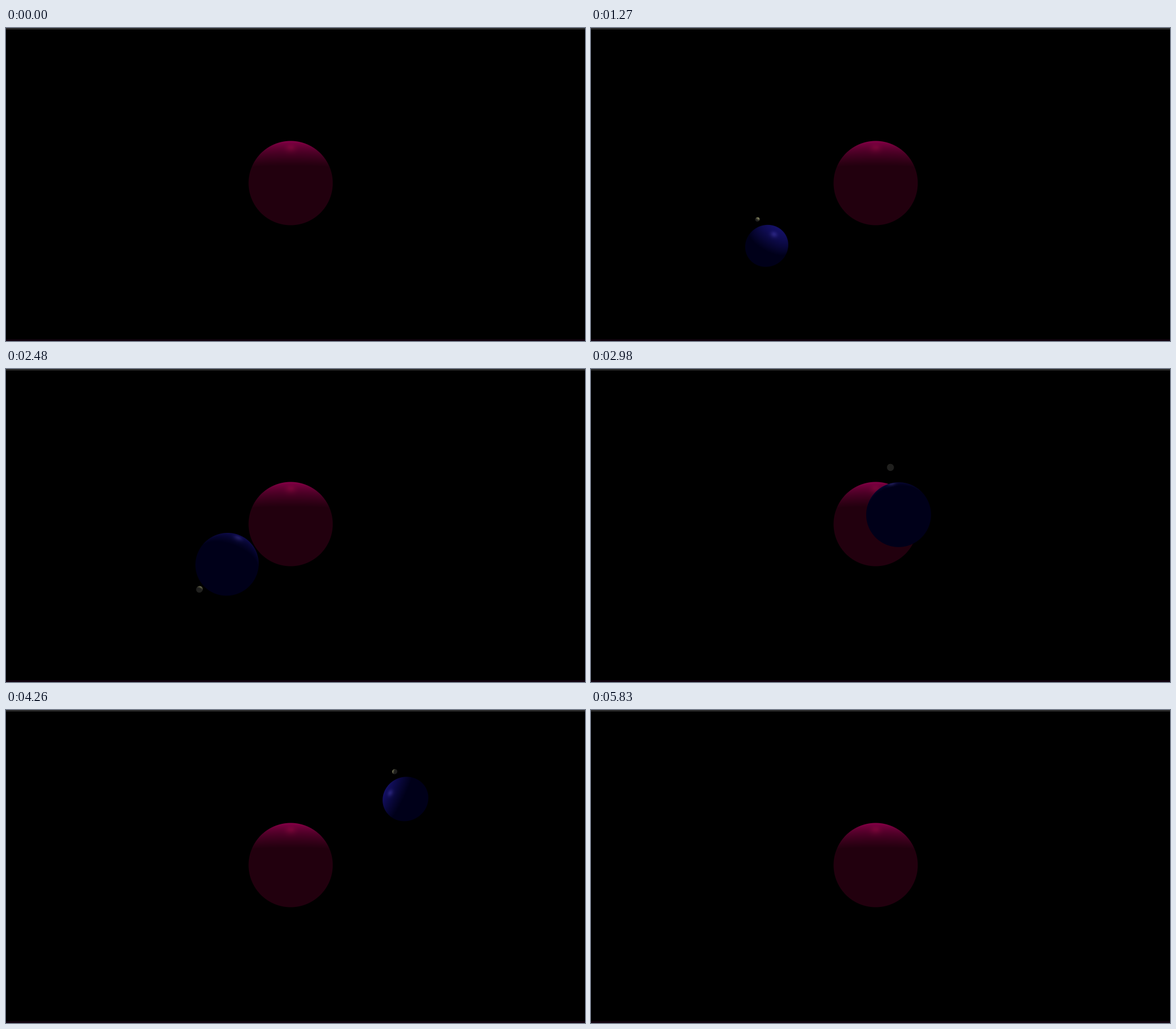
These frames come from a looping animation (1018x550 px, 5.86 s). An HTML page with a canvas:

```html
<!DOCTYPE html>
<html lang="en">
<head>
<meta charset="utf-8">
<title>Orbit</title>
<style>
  html, body { margin: 0; width: 100%; height: 100%; overflow: hidden; background: #000; }
  canvas { display: block; width: 1018px; height: 550px; }
</style>
</head>
<body>
<canvas id="stage" width="1018" height="550"></canvas>
<script>
const LOOP = 5860, STEP = LOOP / 174;
const FOCAL = 650, CENTER = { x: 500.5, y: 272.5 };
const SUN_DEPTH = 17.5, ORBIT = 6.08, MOON_ORBIT = 1.5;
const LIGHT = [0, -5.4, SUN_DEPTH];
const TILT = Math.PI / 6, COS = Math.cos(TILT), SIN = Math.sin(TILT);

const sun = { radius: 1.98, ambient: [34, 0, 14], diffuse: [106, 0, 60], specular: [24, 4, 8] };
const planet = { radius: 1, ambient: [0, 0, 25], diffuse: [20, 16, 76], specular: [24, 22, 40] };
const moon = { radius: 0.108, ambient: [32, 32, 30], diffuse: [96, 96, 62], specular: [20, 20, 16] };

const ctx = document.getElementById('stage').getContext('2d');

const rad = deg => deg * Math.PI / 180;
const dot = (a, b) => a[0] * b[0] + a[1] * b[1] + a[2] * b[2];
const sub = (a, b) => a.map((v, i) => v - b[i]);
const unit = a => { const n = Math.hypot(...a); return a.map(v => v / n); };
const clamp01 = v => Math.max(0, Math.min(1, v));

// Coordinates along the tilted orbit line, its upward normal and depth
const tilted = (along, up, depth) => [-COS * along - SIN * up, SIN * along - COS * up, depth];

function shade(body, point, ray) {
  const normal = unit(sub(point, body.pos));
  const toLight = unit(sub(LIGHT, point));
  const half = unit(sub(toLight, ray));
  const diffuse = Math.max(0, dot(normal, toLight));
  const specular = diffuse > 0 ? Math.max(0, dot(normal, half)) ** 64 : 0;
  return body.ambient.map((a, i) => a + body.diffuse[i] * diffuse + body.specular[i] * specular);
}

function renderSphere(body) {
  const [x, y, z] = body.pos, R = body.radius, scale = FOCAL / z;
  const reach = Math.ceil(R * scale * 1.12) + 4, size = reach * 2;
  const left = Math.round(CENTER.x + x * scale) - reach;
  const top = Math.round(CENTER.y + y * scale) - reach;
  const layer = body.layer || (body.layer = document.createElement('canvas'));
  layer.width = layer.height = size;
  const layerCtx = layer.getContext('2d');
  const image = layerCtx.createImageData(size, size);
  const distSq = dot(body.pos, body.pos);

  for (let row = 0; row < size; row++) {
    for (let col = 0; col < size; col++) {
      const ray = unit([left + col + 0.5 - CENTER.x, top + row + 0.5 - CENTER.y, FOCAL]);
      const nearest = dot(ray, body.pos);
      const missSq = Math.max(0, distSq - nearest * nearest);
      const coverage = clamp01((R - Math.sqrt(missSq)) * scale + 0.5);
      if (!coverage) continue;
      const hit = nearest - Math.sqrt(Math.max(0, R * R - missSq));
      const color = shade(body, ray.map(v => v * hit), ray);
      image.data.set([...color, coverage * 255], (row * size + col) * 4);
    }
  }
  layerCtx.putImageData(image, 0, 0);
  body.left = left;
  body.top = top;
}

function place(seconds) {
  const turn = rad(9.3 + 60.2 * seconds);
  const moonTurn = rad(29.5 + 240 * seconds);
  const c = Math.cos(turn), s = Math.sin(turn);
  planet.pos = tilted(ORBIT * s, 0, SUN_DEPTH + ORBIT * c);
  planet.pos[1] -= 0.12 * c;
  // The moon's orbital plane turns along with the planet
  const side = MOON_ORBIT * Math.sin(moonTurn);
  const offset = tilted(side * c, MOON_ORBIT * Math.cos(moonTurn), -side * s);
  moon.pos = planet.pos.map((v, i) => v + offset[i]);
}

function draw(ms) {
  place(Math.floor(ms / STEP + 0.3) * STEP / 1000);
  renderSphere(planet);
  renderSphere(moon);
  ctx.fillStyle = '#000';
  ctx.fillRect(0, 0, 1018, 550);
  ctx.fillStyle = '#2b2b2b';
  ctx.fillRect(0, 0, 1018, 2);
  ctx.fillStyle = '#1c1c1c';
  ctx.fillRect(0, 2, 1018, 1);
  ctx.fillStyle = '#12030f';
  ctx.fillRect(0, 547, 1018, 3);
  [sun, planet, moon]
    .sort((a, b) => b.pos[2] - a.pos[2])
    .forEach(body => ctx.drawImage(body.layer, body.left, body.top));
}

sun.pos = [0, 0, SUN_DEPTH];
renderSphere(sun);

const start = performance.now();
function tick() {
  draw((performance.now() - start) % LOOP);
  requestAnimationFrame(tick);
}
tick();
</script>
</body>
</html>
```
